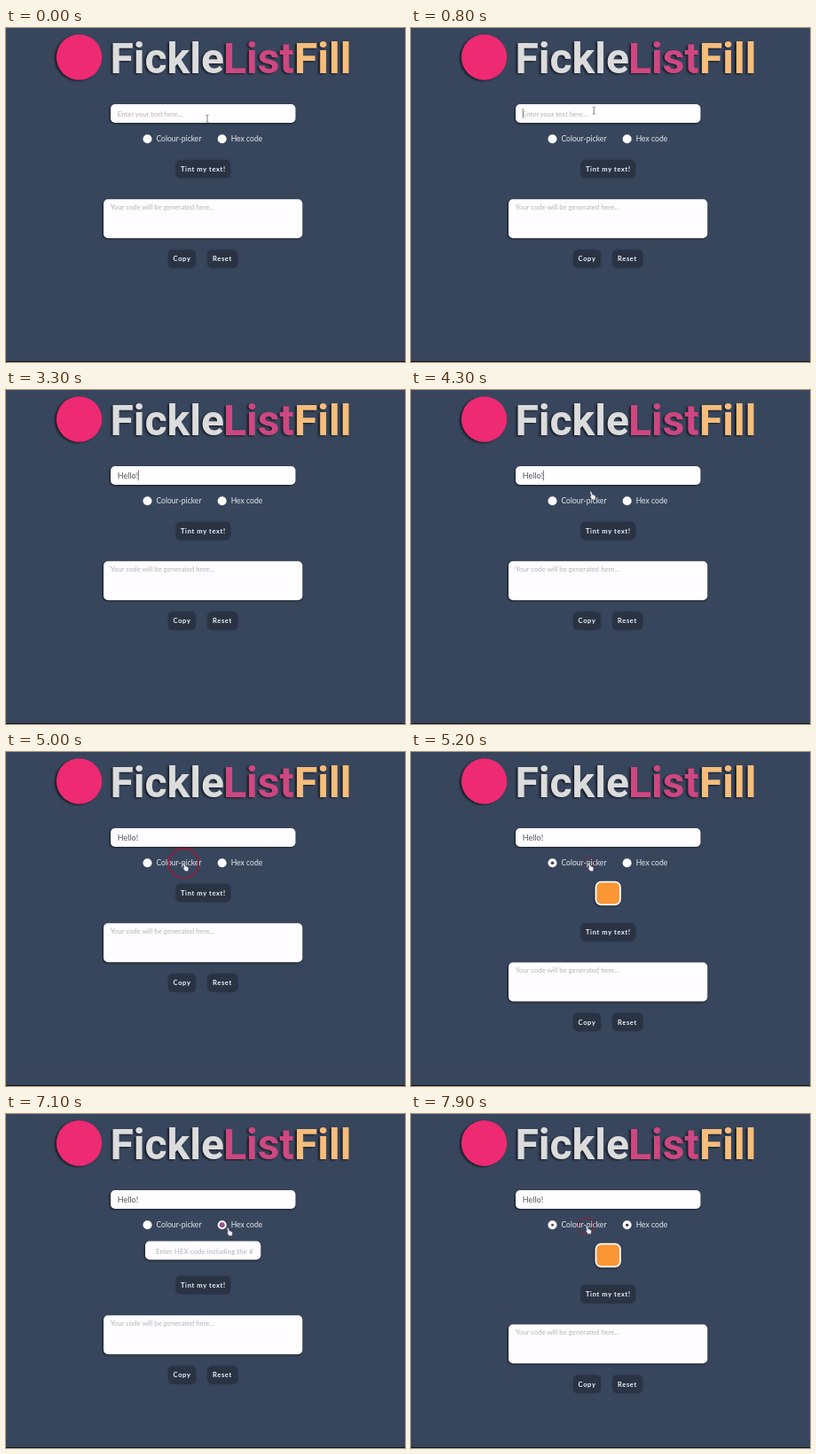
Recreate the animation shown at these times as an HTML page. Size 450 by 377 pixels, loop 8 s.

```html
<!DOCTYPE html>
<html lang="en">
<head>
<meta charset="utf-8">
<title>FickleListFill</title>
<style>
  html, body { margin: 0; width: 100%; height: 100%; overflow: hidden; background: #38465d; }
  svg { display: block; width: 100vw; height: 100vh; font-family: Lato, "Open Sans", sans-serif; }
  .title { font: bold 48px Roboto, sans-serif; filter: drop-shadow(-1.5px 1.5px 1px #0009); }
  .box { fill: #fffdff; filter: drop-shadow(-1px 1.5px 1.2px #0009); }
  .hint { fill: #b3b1b6; font-size: 7.8px; }
  .label { fill: #e4e7eb; font-size: 8.6px; }
  .button rect { fill: #293344; filter: drop-shadow(0 .5px 1px #0004); }
  .button text { fill: #f1f2f4; font-weight: bold; font-size: 7.6px; letter-spacing: .6px; }
</style>
</head>
<body>
<svg viewBox="0 0 450 377">
  <rect width="450" height="377" fill="#38465d"/>
  <rect y="376" width="450" height="1" fill="#10141b"/>

  <g class="title">
    <circle cx="82.5" cy="33" r="25.7" fill="#ee2a72"/>
    <text x="117.5" y="51" fill="#dcdcdc">Fickle</text>
    <text x="245" y="51" fill="#ce4780">List</text>
    <text x="325" y="51" fill="#f6bd7b">Fill</text>
  </g>

  <rect class="box" x="118" y="86" width="208.5" height="21" rx="5"/>
  <text id="inputHint" class="hint" x="125.8" y="100">Enter your text here...</text>
  <text id="typed" x="125.8" y="100" font-size="9" fill="#55555c"></text>
  <rect id="caret" y="90.6" width=".7" height="11.6" fill="#55555c"/>

  <circle cx="159.5" cy="125.3" r="5" fill="#fff"/>
  <circle id="dotPicker" cx="159.5" cy="125.3"/>
  <text class="label" x="169.4" y="128.4">Colour-picker</text>
  <circle cx="243.7" cy="125.3" r="5" fill="#fff"/>
  <circle id="dotHex" cx="243.7" cy="125.3"/>
  <text class="label" x="253.7" y="128.4">Hex code</text>

  <rect id="swatch" x="208.5" y="146.7" width="27.5" height="25.6" rx="6"
    fill="#fa9634" stroke="#fff" stroke-width="1.8" style="filter:drop-shadow(-1px 1px 1px #0008)"/>
  <g id="hex">
    <rect class="box" x="157" y="143.5" width="130.3" height="21" rx="5"/>
    <text class="hint" x="169" y="157.5" style="font-size:8px">Enter HEX code including the #</text>
  </g>

  <g id="lower">
    <g class="button"><rect x="191.5" y="149" width="61.5" height="20.3" rx="5"/><text x="197" y="162">Tint my text!</text></g>
    <rect class="box" x="110" y="193.3" width="224.3" height="44" rx="5"/>
    <text class="hint" x="117.8" y="205">Your code will be generated here...</text>
    <g class="button"><rect x="183" y="250.5" width="31" height="20.3" rx="5"/><text x="188.6" y="263.4">Copy</text></g>
    <g class="button"><rect x="227.3" y="250.5" width="34" height="20.3" rx="5"/><text x="233" y="263.4">Reset</text></g>
  </g>

  <circle id="ring" fill="none" stroke="#a01633" stroke-width="1.4"/>
  <path id="beam" d="M-1.6-4q1.6 0 1.6 1q0-1 1.6-1M0-3V3M-1.6 4q1.6 0 1.6-1q0 1 1.6 1" fill="none" stroke="#97979c" stroke-width="1.2"/>
  <path id="hand" d="M0 .8Q.8-.5 1.8.8L3 3.8L5 4.4Q6.6 5 6.4 6.6L6 9.6H2.6L.4 6.4Q0 5.4 1.4 5.6Z"
    fill="#eeeef1" stroke="#4a4d58" stroke-width=".5"/>
</svg>

<script>
const LOOP = 8000;
const el = id => document.getElementById(id);
const ramp = (t, a, b) => Math.min(1, Math.max(0, (t - a) / (b - a)));
const ease = p => p * p * (3 - 2 * p);
const show = (id, on) => el(id).style.display = on ? "" : "none";

// Pointer stops: time, x, y
const path = [
  [100, 227, 102], [420, 206.3, 93], [3750, 206.3, 93], [4650, 199.5, 125],
  [5650, 199.5, 125], [6220, 272, 124], [6850, 272, 124], [7100, 249, 128], [7450, 197, 126]
];
// Mouse presses: down, up
const presses = [[430, 550], [4820, 5050], [6250, 6400], [7650, 7790]];
const keys = [1700, 2000, 2300, 2550, 2800, 3000];
const [, pickUp, hexUp, againUp] = presses.map(p => p[1]);

function pointerAt(t) {
  const i = path.findIndex(p => p[0] > t);
  if (i < 0) return path.at(-1).slice(1);
  if (!i) return path[0].slice(1);
  const [a, b] = [path[i - 1], path[i]];
  const p = ease(ramp(t, a[0], b[0]));
  return [1, 2].map(k => a[k] + (b[k] - a[k]) * p);
}

function setDot(id, p) {
  el(id).setAttribute("r", 3 * p);
  el(id).setAttribute("fill", p < 1 ? "#453349" : "#a04a98");
}

function draw(t) {
  const [x, y] = pointerAt(t);
  const inInput = y < 108;
  show("beam", inInput && !(t >= 1900 && t < 3750));
  show("hand", !inInput);
  for (const id of ["beam", "hand"]) el(id).setAttribute("transform", `translate(${x} ${y})`);

  const press = presses.find(([down, up]) => t >= down && t < up + 250);
  show("ring", press);
  if (press) {
    const left = 1 - ramp(t, press[1], press[1] + 250);
    const ring = el("ring");
    ring.setAttribute("cx", x + .7);
    ring.setAttribute("cy", y + .6);
    ring.setAttribute("r", 16.8 * left);
    ring.setAttribute("opacity", left);
  }

  const count = keys.filter(k => t >= k).length;
  el("typed").textContent = "Hello!".slice(0, count);
  show("inputHint", !count);
  const since = t - (count ? keys[count - 1] : 550);
  show("caret", since >= 0 && since % 1000 < 500 && t < presses[1][0]);
  el("caret").setAttribute("x", 125.8 + (count ? el("typed").getComputedTextLength() : 0));

  const hexMode = t >= hexUp && t < againUp;
  const picker = t >= pickUp && !hexMode;
  show("swatch", picker);
  show("hex", hexMode);
  el("lower").setAttribute("transform", `translate(0 ${picker ? 44.2 : hexMode ? 34 : 0})`);

  const [on, swap, back] = [pickUp, hexUp, againUp].map(u => ramp(t, u, u + 250));
  setDot("dotPicker", on - swap + back);
  setDot("dotHex", swap - back);
}

const start = performance.now();
function tick() {
  draw((performance.now() - start) % LOOP);
  requestAnimationFrame(tick);
}
tick();
</script>
</body>
</html>
```
